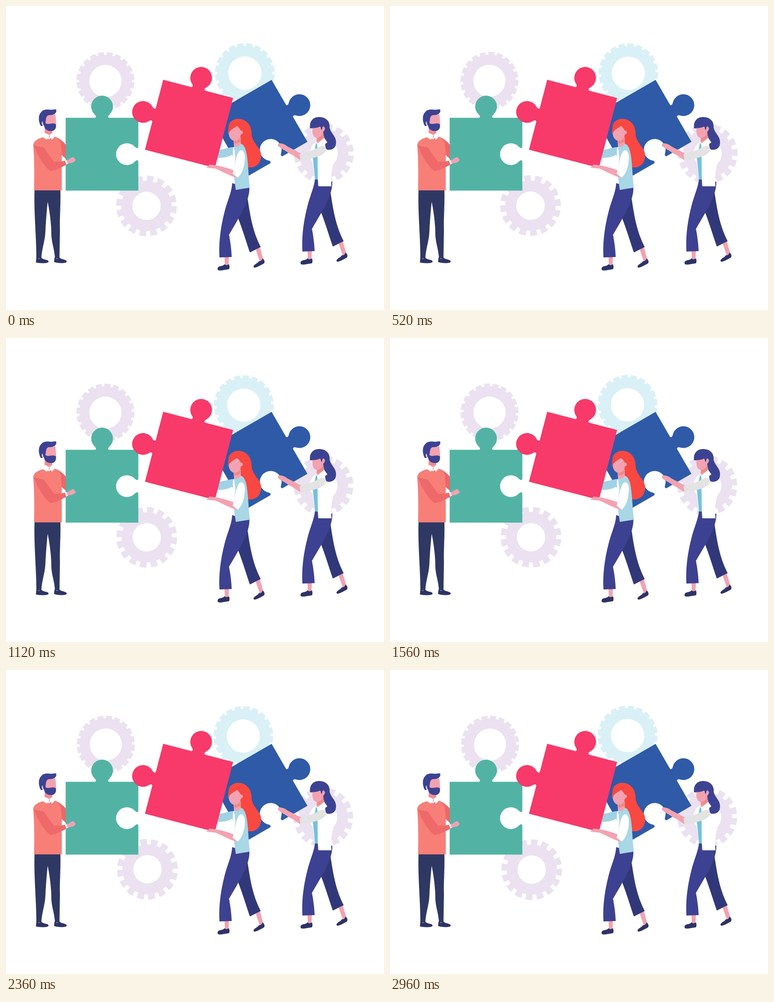
An HTML page that plays this animation: 834x671 px, repeating every 3 s.

```html
<!DOCTYPE html>
<html lang="en">
<head>
<meta charset="utf-8">
<title>Teamwork puzzle</title>
<style>
html, body { margin: 0; width: 100%; height: 100%; overflow: hidden; background: #fff; }
svg { display: block; width: 834px; height: 671px; }
.skin { fill: #f2a2b1; }
.shade { fill: #ee8a8c; }
.hair { fill: #3c4292; }
.red { fill: #f84841; }
.shoe { fill: #2d3365; }
.white { fill: #fff; }
</style>
</head>
<body>
<svg viewBox="0 0 834 671">
<defs>
  <path id="knob" d="M-17 1C-13 -1 -12 -3 -16 -7.3A24 24 0 1 1 16 -7.3C12 -3 13 -1 17 1Z"/>
  <g id="legs">
    <path class="skin" d="M482 552H492L491 572H483ZM551 538L560 532L568 560L560 564Z"/>
    <path class="shoe" d="M467 578C469 573 479 575 482 570C486 573 489 572 492 570C494 575 493 580 492 581C482 582 470 586 467 582ZM546 575C548 569 556 568 558 563C562 564 565 561 566 557C571 561 572 566 568 569C560 573 550 579 547 577Z"/>
    <path fill="#31387a" d="M510 463L531 411C536 440 540 490 562 532L538 544C528 515 521 490 510 463Z"/>
    <path fill="#3c4191" d="M499 391L537 401C538 432 512 470 492 505Q497 530 498 554L471 555C469 525 473 490 482 455C488 430 498 412 499 391Z"/>
  </g>
</defs>

<g id="gears"></g>

<!-- man, behind his piece -->
<path fill="#2f3863" d="M63 405H120C121 440 118 470 119 495L118 557H108C107 535 99 520 100 497C99 470 95 448 92 432C90 450 88 475 87 497C86 520 79 535 78 557H67C67 510 61 450 63 405Z"/>
<path class="shoe" d="M67 555C71 559 75 558 78 555C81 561 94 559 94 564C94 569 74 568 66 566ZM107 555C111 559 115 558 118 555C121 560 134 559 134 564C134 569 114 568 106 565Z"/>
<path class="skin" d="M85 268H102V284L95 291L85 284Z"/>
<path class="shade" d="M86 273Q94 279 102 275V280Q93 284 86 279Z"/>
<path fill="#ef6668" d="M106 288C118 291 127 300 132 306V337L118 325Z"/>
<path fill="#f77f78" d="M84 289C71 292 61 297 60 307C62 330 63 360 62 407H123V328L121 302C118 295 113 290 104 288L95 294Z"/>
<path class="white" d="M82 290L86 280L96 286L102 280L107 289L101 295L96 286L90 295Z"/>
<path class="skin" d="M87 242L109 239L111 262L96 266L84 264C78 260 79 253 84 255Z"/>
<path class="hair" d="M77 265C71 255 71 241 77 235C83 226 94 229 101 229C106 228 111 228 111 229C112 239 103 241 94 241C88 242 88 252 87 258C92 264 101 256 110 261C112 271 106 277 98 276C90 276 85 271 84 264C81 263 83 256 80 255C78 258 79 262 82 264Z"/>

<g fill="#52b3a5">
  <path d="M131.6 246.8H292V407.4H131.6Z"/>
  <use href="#knob" x="212" y="247"/>
</g>
<use href="#knob" class="white" transform="translate(292 327) rotate(-90)"/>

<!-- man's near arm -->
<path fill="#ef696a" d="M62 308C68 328 84 353 97 364C109 364 122 356 134 350L131 341C122 344 114 343 106 344C98 333 91 323 83 312Z"/>
<path class="white" d="M130 341L134 340L137 348L133 350Z"/>
<path class="skin" d="M134 341C140 338 147 332 151 334L149 336C155 337 155 341 150 344C146 347 141 346 136 348Z"/>

<g transform="translate(449.2 242) rotate(-30)">
  <path fill="#2e5aa8" d="M0 0H158V158H0Z"/>
  <use href="#knob" fill="#2e5aa8" transform="translate(158 79) rotate(90)"/>
  <use href="#knob" class="white" x="79" y="158"/>
</g>

<!-- woman with red hair -->
<path fill="#a0d2e4" d="M465 319L500 311L506 323C495 333 480 336 464 335Z"/>
<g fill="#f73a69" transform="translate(346.8 162.8) rotate(14.6)">
  <path d="M0 0H159.5V159.5H0Z"/>
  <use href="#knob" x="80"/>
  <use href="#knob" transform="translate(0 80) rotate(-90)"/>
</g>
<use href="#legs"/>
<path class="red" d="M491 272C489 258 500 249 512 249C530 249 543 263 542 285C545 304 563 313 563 330C562 350 550 358 533 356L519 310L510 275Z"/>
<path class="white" d="M501 312L519 304L527 350L505 372L499 350Z"/>
<path fill="#a8d7e6" d="M503 309L521 305C535 315 533 356 538 401L507 406L502 370L506 335Z"/>
<path class="skin" d="M502 290H518V306Q511 313 503 310Z"/>
<path class="shade" d="M502 297Q512 296 517 286V300Q510 305 502 303Z"/>
<ellipse class="skin" cx="505" cy="281" rx="13.5" ry="16.5"/>
<circle class="skin" cx="518.5" cy="279" r="4"/>
<path class="red" d="M490 284C488 262 500 251 512 250C528 251 533 270 522 275C517 274 514 269 511 263C505 270 494 271 490 284Z"/>
<path class="skin" d="M511 380C495 375 478 366 463 359L443 357L443 355L450 354L446 352L450 350L466 352C480 355 494 359 506 364Z"/>
<path class="white" d="M514 321C520 315 527 320 527 334C527 355 520 372 511 379L500 370C505 355 506 333 514 321Z"/>

<!-- woman with blue hair -->
<use href="#legs" transform="translate(183 -13)"/>
<path class="white" d="M682 304L704 298C722 302 731 315 728 335C721 350 716 365 718 398H689L688 383H682L675 333Z"/>
<path fill="#72c3dc" d="M684 302L687 306L688 383H682L677 335Z"/>
<path class="hair" d="M671 270C668 253 680 244 692 245C707 246 715 255 714 268C716 281 730 288 728 303C728 314 718 319 708 317C702 312 706 300 702 290L696 270Z"/>
<path class="skin" d="M686 287H701V296L688 304L685 300Z"/>
<path class="shade" d="M686 291Q696 290 700 279L702 290Q696 298 686 298Z"/>
<path class="skin" d="M676 266H697C705 262 706 273 700 277C700 286 692 292 685 291C677 290 675 279 676 266Z"/>
<path class="hair" d="M671 269C670 253 681 246 692 247C704 248 709 262 704 270C700 262 698 266 697 274C694 272 695 267 693 266C687 269 680 270 671 269Z"/>
<path class="white" d="M687 304L702 291L709 301L694 312Z"/>
<path class="skin" d="M600 304C607 302 615 305 621 310L650 325L649 340C640 334 632 328 624 325C614 317 604 314 600 308Z"/>
<path fill="#e3e3e3" d="M648 327C664 322 682 317 694 309C704 306 709 315 704 322C698 332 670 338 652 340Q647 333 648 327Z"/>
</svg>
<script>
const LOOP = 3000, STEP = 40;
const LILAC = '#ebe1f0', ICE = '#d9f0f6';

// x, y: hub at rest; px, py: slightly off-centre pivot; phase in degrees
const gears = [
  { x: 219.4, y: 165.6, px: 220, py: 165.2, r: 64, root: 58, hole: 35.5, teeth: 20, gap: 0.3, phase: 9, fill: LILAC },
  { x: 527, y: 148, px: 525.7, py: 146.3, r: 66, root: 60.5, hole: 36.7, teeth: 20, gap: 0.3, phase: 9, fill: ICE },
  { x: 310, y: 441.3, px: 311.3, py: 441, r: 67, root: 55.5, hole: 31.3, teeth: 16, gap: 0.38, phase: 7.6, fill: LILAC },
  { x: 701.2, y: 325.8, px: 700.6, py: 325.4, r: 66, root: 54.5, hole: 31, teeth: 16, gap: 0.38, phase: 11.2, fill: LILAC }
];

function gearPath({ x, y, r, root, hole, teeth, gap, phase }) {
  const pitch = 2 * Math.PI / teeth, start = phase * Math.PI / 180;
  const w = (1 - gap) / 2 * pitch;
  const point = (radius, a) =>
    (x + radius * Math.cos(a)).toFixed(2) + ' ' + (y + radius * Math.sin(a)).toFixed(2);
  let d = '';
  for (let i = 0; i < teeth; i++) {
    const a = start + i * pitch;
    d += `${i ? 'L' : 'M'}${point(root, a - w)}L${point(r, a - w)}` +
      `A${r} ${r} 0 0 1 ${point(r, a + w)}L${point(root, a + w)}`;
  }
  return d + `ZM${x - hole} ${y}a${hole} ${hole} 0 1 0 ${2 * hole} 0a${hole} ${hole} 0 1 0 ${-2 * hole} 0Z`;
}

for (const g of gears) {
  g.el = document.createElementNS('http://www.w3.org/2000/svg', 'path');
  g.el.setAttribute('d', gearPath(g));
  g.el.setAttribute('fill', g.fill);
  g.el.setAttribute('fill-rule', 'evenodd');
  document.getElementById('gears').append(g.el);
}

const begin = performance.now();
function draw() {
  const t = (performance.now() - begin) % LOOP;
  const angle = Math.floor(t / STEP) * STEP / LOOP * 180;
  for (const g of gears) g.el.setAttribute('transform', `rotate(${angle} ${g.px} ${g.py})`);
  requestAnimationFrame(draw);
}
draw();
</script>
</body>
</html>
```
